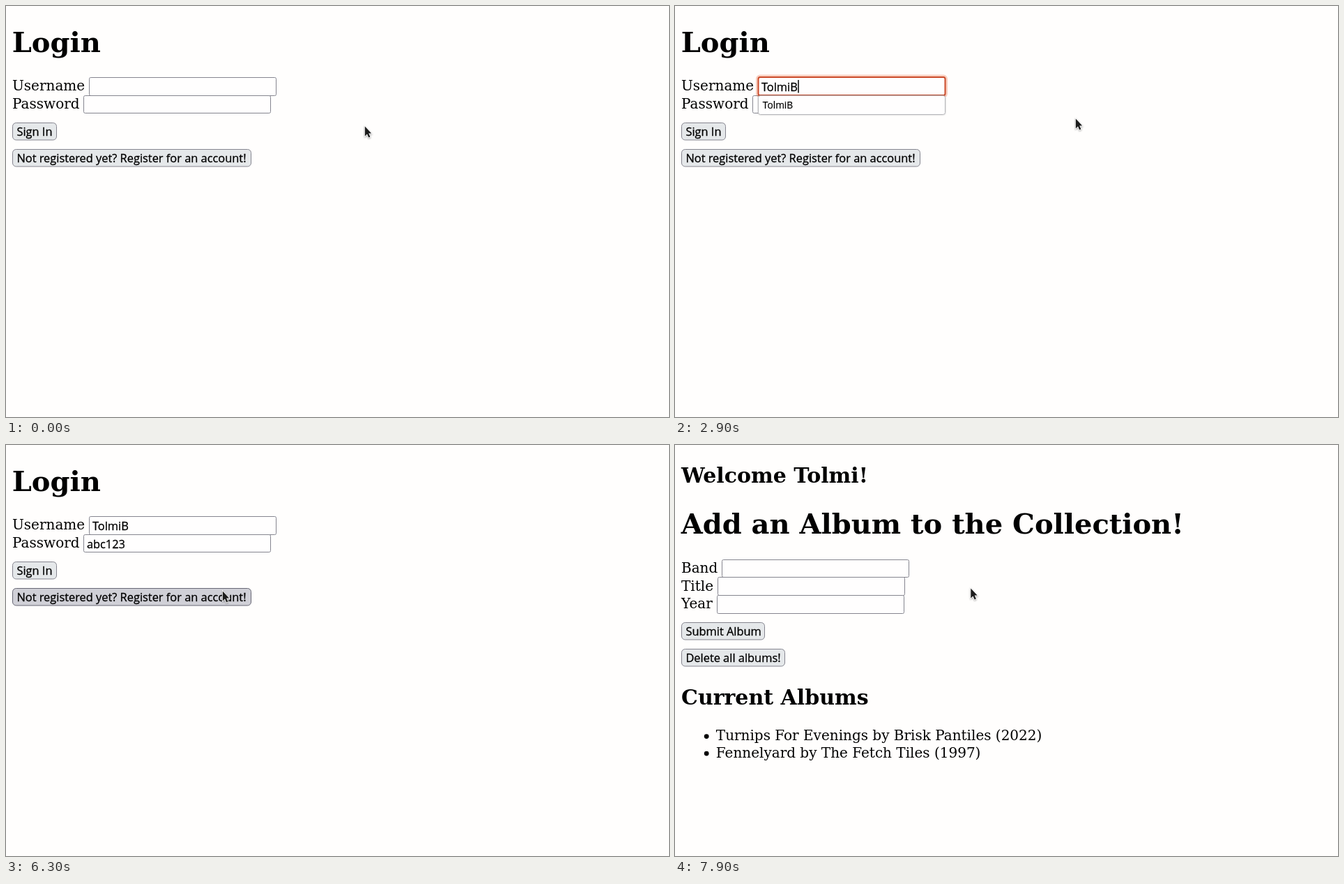
Write an HTML page that moves like this. It is 951 px wide and 589 px high and loops after 8 s.

```html
<!DOCTYPE html>
<html lang="en">
<head>
<meta charset="utf-8">
<title>Login</title>
<style>
  html, body { margin: 0; width: 100%; height: 100%; overflow: hidden; background: #fffefd; }
  svg { display: block; width: 100vw; height: 100vh; --k: 1; }
  text { fill: #000; white-space: pre; }
  .body, .h1, .h2 { font-family: "DejaVu Serif", "Noto Serif", serif; }
  .body { font-size: calc(20px * var(--k)); }
  .h1 { font-size: calc(40px * var(--k)); font-weight: 700; }
  .h2 { font-size: calc(30px * var(--k)); font-weight: 700; }
  .ui, .option { font: 16.4px "Open Sans", "Noto Sans", sans-serif; stroke: #000; stroke-width: .3; }
  .option { font-size: 13.7px; stroke-width: .2; }
  .field { fill: #fffefe; stroke: #85858f; }
  .field.hover { stroke: #676774; }
  .glow { fill: none; stroke: #e95420; stroke-opacity: .28; stroke-width: 3; }
  .ring { fill: #fffefe; stroke: #cb4b2a; stroke-width: 2; }
  .button { fill: #e5e8ea; stroke: #85858f; }
  .button.hover { fill: #d0d0d7; stroke: #676774; }
  .button.active { fill: #adadb6; stroke: #50505b; }
  .menu { fill: #fffefe; stroke: #b6b6ba; filter: drop-shadow(0 .5px .8px rgba(0, 0, 0, .25)); }
  .arrow { fill: #1c1c1c; stroke: #fff; stroke-width: 1.6; paint-order: stroke;
           filter: drop-shadow(.6px 1px .8px rgba(0, 0, 0, .35)); }
  .halo { fill: none; stroke: #fff; stroke-width: 3; }
  .beam { fill: none; stroke: #222; stroke-width: 1.2; }
</style>
</head>
<body>
<svg id="stage" viewBox="0 0 951 589" preserveAspectRatio="none"></svg>
<script>
const LOOP = 8000;
const USER = 'TolmiB';
const PASS = 'abc123';
const FIELD_W = 268;
const stage = document.getElementById('stage');

// Each step changes part of the state: pointer [x, y, kind], hover, focus, text, menus.
const steps = [
  [0, { page: 'login', at: [514, 172, 'arrow'], hover: '', active: '', focus: '',
        user: '', pass: '', menu: '', rows: 0, list: false }],
  [600, { at: [491, 173, 'arrow'] }],
  [700, { at: [424, 163, 'arrow'] }],
  [800, { at: [322, 139, 'beam'], hover: 'pass' }],
  [900, { at: [257, 110, 'beam'], hover: 'user' }],
  [1100, { focus: 'user' }],
  [1500, { at: [322, 119, 'beam'] }],
  [1600, { at: [486, 146, 'arrow'], hover: '' }],
  [1700, { at: [574, 161, 'arrow'] }],
  ...[1, 2, 3, 4, 5].map(n => [2000 + n * 100, { user: USER.slice(0, n), menu: 'user', rows: 2 }]),
  [2900, { user: USER, rows: 1 }],
  [3400, { focus: 'pass', menu: '' }],
  [4200, { pass: PASS.slice(0, 1) }],
  [4400, { menu: 'pass', rows: 1 }],
  [4600, { pass: PASS.slice(0, 3) }],
  [4800, { pass: PASS.slice(0, 4) }],
  [5100, { pass: PASS.slice(0, 5) }],
  [5200, { pass: PASS }],
  [5700, { focus: '' }],
  [5900, { menu: '' }],
  [6100, { at: [545, 171, 'arrow'] }],
  [6200, { at: [440, 194, 'arrow'] }],
  [6300, { at: [310, 209, 'arrow'], hover: 'register' }],
  [6400, { at: [172, 207, 'arrow'] }],
  [6500, { at: [76, 190, 'arrow'], hover: '' }],
  [6600, { at: [38, 170, 'arrow'], hover: 'sign' }],
  [6800, { at: [29, 170, 'arrow'] }],
  [7000, { at: [28.5, 175, 'arrow'] }],
  [7100, { active: 'sign' }],
  [7200, { page: 'albums', at: [29, 175, 'beam'], hover: '', active: '' }],
  [7500, { list: true }],
  [7600, { at: [150, 177, 'beam'], hover: 'band' }],
  [7800, { at: [300, 200, 'beam'], hover: 'title' }],
  [7900, { at: [423.5, 205, 'arrow'], hover: '' }]
];

let last = {};
const states = steps.map(([time, change]) => [time, last = { ...last, ...change }]);

const text = (kind, x, y, s) => `<text class="${kind}" x="${x}" y="${y}">${s}</text>`;
const rect = (kind, x, y, w, h, r) =>
  `<rect class="${kind}" x="${x}" y="${y}" width="${w}" height="${h}" rx="${r}"/>`;

// Advance width of a string in the form font, used to place the caret.
const pen = document.createElement('canvas').getContext('2d');
function uiWidth(s) {
  pen.font = '16.4px "Open Sans", "Noto Sans", sans-serif';
  return pen.measureText(s).width;
}

// The fallback serif runs narrower, so it is set slightly larger.
function serifScale() {
  const width = font => (pen.font = font, pen.measureText('Username').width);
  return width('40px "DejaVu Serif", monospace') === width('40px monospace') ? 1.05 : 1;
}

function field(s, id, x, y, h, value = '') {
  const focused = s.focus === id;
  const hover = s.hover === id ? ' hover' : '';
  let out = focused
    ? rect('glow', x - 2, y - 2.5, FIELD_W + 4, h + 4, 4.5) + rect('ring', x, y - .5, FIELD_W, h, 2.5)
    : rect('field' + hover, x, y, FIELD_W, h, 2);
  out += text('ui', x + 4.4, y + 19, value);
  if (focused) {
    const caret = x + 5 + uiWidth(value);
    out += `<path d="M${caret + .5} ${y + 3.5}v18.5" stroke="#000" stroke-width="1.5"/>`;
  }
  return out;
}

function button(s, id, y, w, label) {
  const mode = s.active === id ? ' active' : s.hover === id ? ' hover' : '';
  return rect('button' + mode, 9.5, y, w, 24.5, 5) + text('ui', 15.4, y + 18, label);
}

function menu(x, y, options) {
  return rect('menu', x, y, FIELD_W, 6 + options.length * 21, 3) +
    options.map((s, i) => text('option', x + 6.3, y + 18.7 + i * 21, s)).join('');
}

function login(s) {
  const fields = [
    field(s, 'user', 119.5, 102.5, 26, s.user),
    field(s, 'pass', 111.5, 128.5, 25, s.pass)
  ];
  if (s.focus === 'user') fields.reverse(); // the focus ring lies on top
  return text('h1', 8.7, 66, 'Login') +
    text('body', 9, 120.8, 'Username') +
    text('body', 9, 146.8, 'Password') +
    fields.join('') +
    button(s, 'sign', 167.5, 63, 'Sign In') +
    button(s, 'register', 205.5, 342, 'Not registered yet? Register for an account!') +
    (s.menu === 'user' ? menu(119.5, 128.5, [USER, 'Tolmi'].slice(0, s.rows)) : '') +
    (s.menu === 'pass' ? menu(111.5, 153.5, [PASS]) : '');
}

function albums(s) {
  const items = [
    'Turnips For Evenings by Brisk Pantiles (2022)',
    'Fennelyard by The Fetch Tiles (1997)'
  ];
  return text('h2', 9, 54, 'Welcome Tolmi!') +
    text('h1', 8.7, 126.5, 'Add an Album to the Collection!') +
    text('body', 9, 182.6, 'Band') + field(s, 'band', 67.5, 164.5, 25) +
    text('body', 9, 208.7, 'Title') + field(s, 'title', 61.5, 189.5, 26) +
    text('body', 9, 234, 'Year') + field(s, 'year', 60.5, 215.5, 26) +
    button(s, 'submit', 254.5, 119, 'Submit Album') +
    button(s, 'delete', 292.5, 148, 'Delete all albums!') +
    text('h2', 9, 371.5, 'Current Albums') +
    (s.list ? items.map((item, i) =>
      `<circle cx="45.2" cy="${417.6 + i * 24.5}" r="3.4"/>` +
      text('body', 58.8, 423 + i * 24.5, item)).join('') : '');
}

function pointer([x, y, kind]) {
  const beam = 'M-3.5-6.5H-1L0-5.5L1-6.5H3.5M0-5.5V5.5M-3.5 6.5H-1L0 5.5L1 6.5H3.5';
  const shape = kind === 'beam'
    ? `<path class="halo" d="${beam}"/><path class="beam" d="${beam}"/>`
    : '<path class="arrow" d="M.8.6V14.4L4 11.4L6.2 16.6L8.4 15.6L6.2 10.6H10.2Z"/>';
  return `<g transform="translate(${x} ${y})">${shape}</g>`;
}

let shown;
function frame() {
  const time = performance.now() % LOOP;
  const state = states.filter(([start]) => start <= time).pop()[1];
  if (state !== shown) {
    shown = state;
    stage.innerHTML = (state.page === 'login' ? login : albums)(state) + pointer(state.at);
  }
  requestAnimationFrame(frame);
}

stage.style.setProperty('--k', serifScale());
frame();
</script>
</body>
</html>
```
